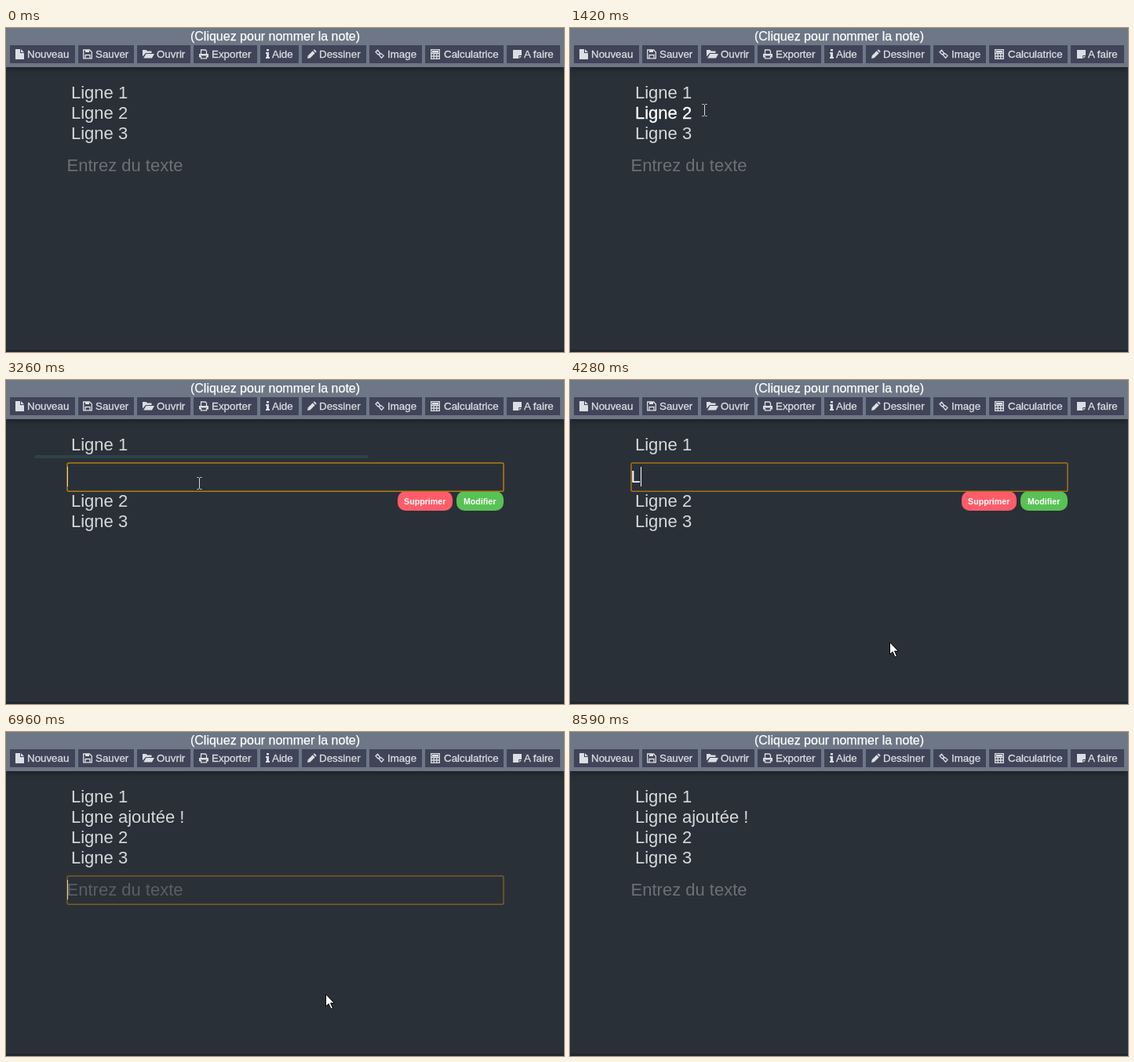
Animation of 711 by 414 pixels, one loop 8.81 s. Source, as an HTML page:

```html
<!DOCTYPE html>
<html lang="fr">
<head>
<meta charset="utf-8">
<title>Bloc-notes</title>
<style>
  html, body { margin: 0; width: 100%; height: 100%; overflow: hidden; background: #2a3038; }
  svg { display: block; width: 711px; height: 414px; font-family: "Liberation Sans", Arial, sans-serif; }
  text { white-space: pre; }
  .bar { fill: #6d7786; filter: drop-shadow(0 2px 4px rgba(0, 0, 0, .4)); }
  .title { font-size: 16px; fill: #fff; stroke: #fff; stroke-width: .25px; text-anchor: middle; }
  .tool rect { fill: #404458; }
  .tool text { font-size: 13.333px; fill: #dcdfe2; stroke: #dcdfe2; stroke-width: .3px; }
  .fill { fill: #dcdfe2; }
  .line { fill: none; stroke: #dcdfe2; stroke-width: 1.3px; }
  .note, #field { font-size: 22px; }
  .note { fill: #d6d9da; }
  .note.hover { fill: #fff; stroke: #fff; stroke-width: .3px; }
  .hint { fill: #6c7076; }
  .typed { fill: #fff; }
  .pill { font-size: 10.67px; font-weight: bold; fill: #fff; text-anchor: middle; }
</style>
</head>
<body>
<svg viewBox="0 0 711 414">
  <rect width="711" height="414" fill="#2a3038"/>
  <rect y="411" width="711" height="3" fill="#23282e"/>
  <rect class="bar" width="711" height="50"/>
  <text class="title" x="343" y="16">(Cliquez pour nommer la note)</text>
  <g id="tools"></g>
  <g id="notes"></g>
  <rect id="mark" x="36" width="426" height="4" rx="2" fill="#3f8a8c"/>
  <g id="pills">
    <rect x="499" y="142" width="70" height="25" rx="10" fill="#ff5c69"/>
    <rect x="574" y="142" width="60" height="25" rx="10" fill="#58c254"/>
    <text class="pill" x="533.7" y="159">Supprimer</text>
    <text class="pill" x="603.7" y="159">Modifier</text>
  </g>
  <g id="field">
    <rect id="ring" x="78" y="-25" width="556" height="36.3" rx="2" fill="none" stroke="#b47c12" stroke-width="1.5"/>
    <text class="hint" x="77.6" y="0">Entrez du texte</text>
    <text class="typed" x="77.6" y="0"></text>
    <rect id="caret" y="-20" width="1" height="25" fill="#fff"/>
  </g>
  <g id="arrow">
    <path d="M.5 .5V16.2L4.1 12.8L7 19.4L9.5 18.3L6.6 11.9H11.4Z" fill="#fff" stroke="#000"/>
    <path id="plus" d="M11 1V7M8 4H14" stroke="#fff" stroke-width="2"/>
  </g>
  <path id="beam" d="M-3 -7.5H-1L0 -6.5L1 -7.5H3M0 -6.5V6.5M-3 7.5H-1L0 6.5L1 7.5H3" fill="none" stroke="#d5d8d4"/>
</svg>
<script>
const $ = id => document.getElementById(id);
const svgTag = (name, attrs, parent, text = '') => {
  const el = document.createElementNS('http://www.w3.org/2000/svg', name);
  for (const k in attrs) el.setAttribute(k, attrs[k]);
  el.textContent = text;
  return parent.appendChild(el);
};

// label, left, width, icon left, text left, filled path, stroked path
const tools = [
  ['Nouveau', 5, 83, 12, 27, 'M0 0H6V5H11V13H0ZM7 0L11 4H7Z', ''],
  ['Sauver', 92, 71, 98, 114, 'M3 1H8V4H3Z', 'M.7 1H8.5L11.3 3.8V11.8H.7ZM3 11.5V7.5H9V11.5'],
  ['Ouvrir', 167, 68, 174, 192, 'M0 9.5V1H4.5L6 2.5H11.5V5H4ZM4.5 6H15L12 11.5H1.2Z', ''],
  ['Exporter', 239, 81, 246, 262, 'M0 6H12V10.5H10V8.5H2V10.5H0Z', 'M2.5 6V1H8L9.5 2.5V6M2.5 9V11.8H9.5V9'],
  ['Aide', 324, 49, 331, 339, 'M1 0H4V2.6H1ZM0 4H4V10H5V12H0V10H1V6H0Z', ''],
  ['Dessiner', 377, 82, 384, 399, 'M0 12L.8 8.3L6.8 2.3L9.7 5.2L3.7 11.2ZM7.6 1.5L9 .3L11.7 3L10.5 4.4Z', ''],
  ['Image', 463, 67, 470, 486, '', 'M5.5 6.5L6.7 5.3L3.5 1.2L1 3.7L4 6.7L5.5 6.5M6.5 6L5.3 7.2L8.5 11.3L11.2 8.6L8 5.6Z'],
  ['Calculatrice', 534, 100, 541, 558, 'M2 2H10V4.5H2Z', 'M.7 .7H11.3V12.3H.7ZM0 5.5H12M0 9H12M4.2 5.5V12M7.8 5.5V12'],
  ['A faire', 638, 68, 646, 660, 'M0 1H11V8H7.3V12H0ZM8.2 9H11L8.2 11.8Z', '']
];
for (const [label, x, width, iconX, textX, fill, line] of tools) {
  const g = svgTag('g', { class: 'tool' }, $('tools'));
  svgTag('rect', { x, y: 22, width, height: 23 }, g);
  const icon = svgTag('g', { transform: `translate(${iconX} 27)` }, g);
  svgTag('path', { class: 'fill', d: fill }, icon);
  svgTag('path', { class: 'line', d: line }, icon);
  svgTag('text', { x: textX, y: 38 }, g, label);
}

const notes = ['Ligne 1', 'Ligne 2', 'Ligne 3', 'Ligne ajoutée !']
  .map(t => svgTag('text', { class: 'note', x: 83, y: 0 }, $('notes'), t));
const hint = document.querySelector('.hint');
const typed = document.querySelector('.typed');

// Baselines of the notes and the field for each page layout
const layouts = {
  list: { rows: [90, 116, 142], field: 183 },
  insert: { rows: [90, 162, 188], field: 131 },
  added: { rows: [90, 142, 168, 116], field: 209 }
};

const LOOP = 8810;
const first = { layout: 'list', cursor: '', x: 0, y: 0, hover: -1, mark: 0, markY: 96, ring: 0, text: '', focus: false };
const at = (cursor, x, y, more) => ({ cursor, x, y, ...more });
const type = text => ({ text });

// Each step changes only what it names
const steps = [
  [0, first],
  [420, at('arrow', 486, 356)],
  [620, at('arrow', 452, 316)],
  [820, at('arrow', 360, 222)],
  [1020, at('beam', 222, 135, { hover: 2 })],
  [1220, at('beam', 180, 112, { hover: 1, mark: .4, markY: 122 })],
  [1420, at('beam', 171.5, 105, { mark: 0 })],
  [1640, at('beam', 173, 90, { hover: 0, markY: 96 })],
  [1840, at('copy', 175, 96, { hover: -1, mark: .4 })],
  [2040, { mark: .8 }],
  [2240, { mark: 1 }],
  [2840, at('beam', 178, 104, { layout: 'insert', focus: true, ring: .4 })],
  [3060, at('beam', 205, 114, { mark: .6, ring: .8 })],
  [3260, at('beam', 246.5, 132, { mark: .2, ring: 1 })],
  [3460, at('arrow', 330, 254, { mark: 0, ring: .9 })],
  [3660, at('arrow', 404, 346)],
  [3860, at('arrow', 407, 334.5)],
  [4280, type('L')],
  [4680, type('Lig')],
  [4880, type('Ligne')],
  [5100, type('Ligne a')],
  [5320, type('Ligne ajou')],
  [5540, type('Ligne ajouté')],
  [5740, type('Ligne ajoutée')],
  [6160, type('Ligne ajoutée ')],
  [6360, type('Ligne ajoutée !')],
  [6760, { layout: 'added', text: '', ring: .25 }],
  [6960, { ring: .6 }],
  [7160, { ring: .8 }],
  [7360, at('arrow', 407, 333, { ring: .9 })],
  [7970, at('arrow', 409, 352, { focus: false, ring: .6 })],
  [8170, at('arrow', 414, 378, { ring: .3 })],
  [8390, at('arrow', 418, 401, { ring: .1 })],
  [8590, { cursor: '', ring: 0 }]
];
const states = [];
steps.reduce((prev, [, change], i) => states[i] = { ...prev, ...change }, {});

const show = (el, on) => el.setAttribute('visibility', on ? 'visible' : 'hidden');

function draw(s) {
  const { rows, field } = layouts[s.layout];
  const inserting = s.layout === 'insert';
  notes.forEach((n, i) => {
    show(n, i < rows.length);
    n.setAttribute('y', rows[i] || 0);
    n.classList.toggle('hover', i === s.hover);
  });
  $('mark').setAttribute('y', s.markY);
  $('mark').setAttribute('opacity', s.mark);
  show($('pills'), inserting);
  $('field').setAttribute('transform', `translate(0 ${field})`);
  $('ring').setAttribute('opacity', s.ring);
  show(hint, !inserting);
  hint.style.fill = s.focus ? '#5a5e62' : '';
  typed.textContent = s.text;
  show($('caret'), s.focus);
  $('caret').setAttribute('x', s.text ? Math.round(77.6 + typed.getComputedTextLength()) : 78);
  $('caret').setAttribute('fill', s.text ? '#fff' : '#e8d3a0');
  const pointer = s.cursor === 'arrow' || s.cursor === 'copy';
  show($('arrow'), pointer);
  show($('plus'), s.cursor === 'copy');
  show($('beam'), s.cursor === 'beam');
  $(pointer ? 'arrow' : 'beam').setAttribute('transform', `translate(${s.x} ${s.y})`);
}

const start = performance.now();
let current = -1;
function tick() {
  const t = (performance.now() - start) % LOOP;
  const i = steps.filter(([time]) => time <= t).length - 1;
  if (i !== current) draw(states[current = i]);
  requestAnimationFrame(tick);
}
tick();
</script>
</body>
</html>
```
